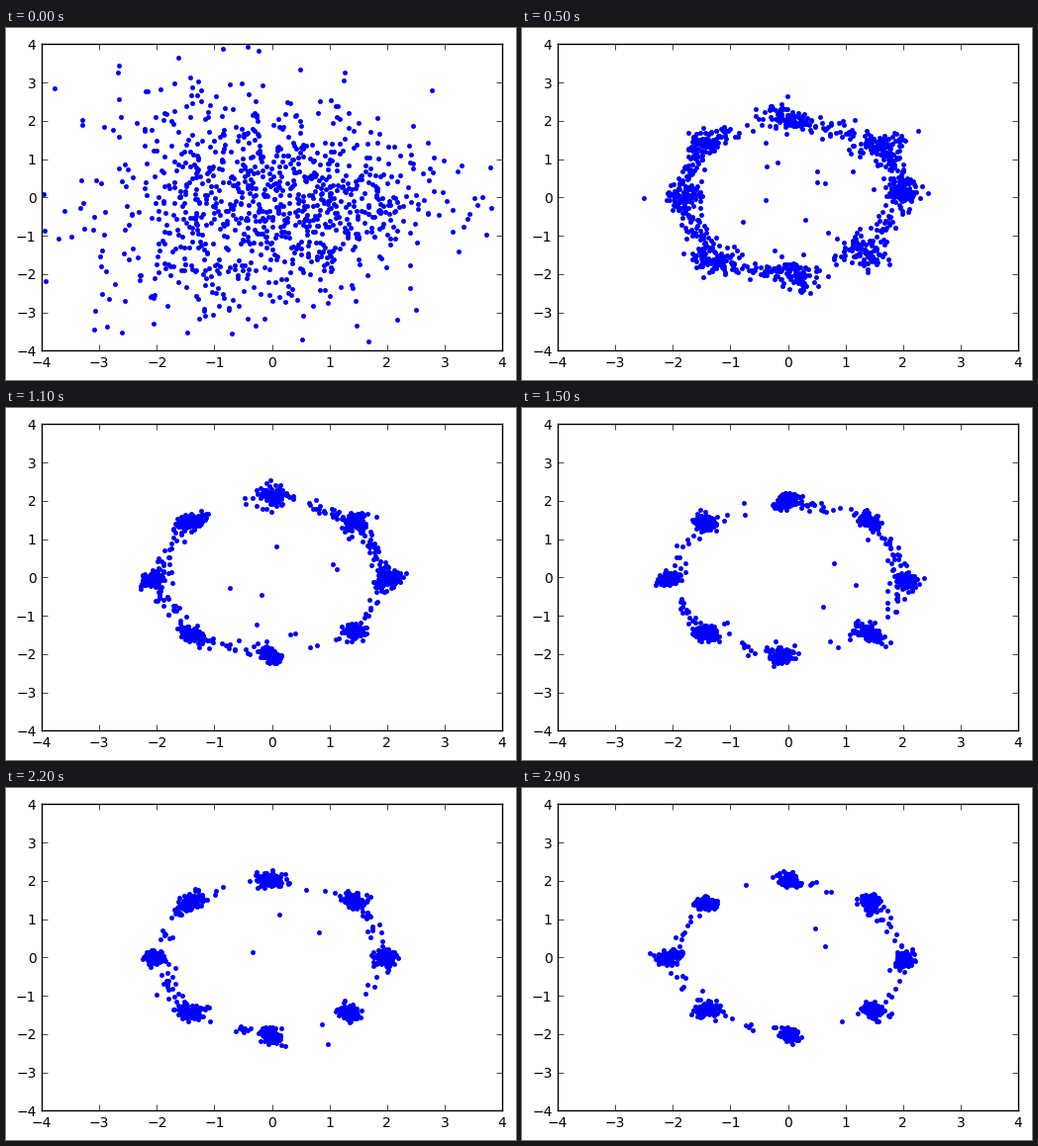
A matplotlib script that plays this animation: 515 by 356 pixels, repeating every 3 s.

```python
import numpy as np
import matplotlib.pyplot as plt
from matplotlib.animation import FuncAnimation

WIDTH, HEIGHT, DPI = 515, 356, 100
FRAMES, INTERVAL = 30, 100
POINTS, MODES, RADIUS = 1000, 8, 2.03

plt.rcParams.update({
    "font.family": "DejaVu Sans",
    "font.size": 10,
    "axes.linewidth": 1.0,
    "axes.axisbelow": False,
    "xtick.major.size": 4, "ytick.major.size": 4,
    "xtick.major.width": 0.5, "ytick.major.width": 0.5,
    "xtick.major.pad": 4, "ytick.major.pad": 4,
    "xtick.direction": "in", "ytick.direction": "in",
    "xtick.top": True, "ytick.right": True,
})


def polar(radius, angle):
    return np.column_stack([radius * np.cos(angle), radius * np.sin(angle)])


def fade(i, start, end, pace):
    """Ease exponentially from start towards end."""
    return end + (start - end) * np.exp(-i / pace)


def cloud(rng):
    """Untrained samples: a funnel, tall on the left and flat on the right."""
    x = rng.normal(-0.05, 1.45, POINTS)
    y = rng.normal(-0.05, 1, POINTS) * np.clip(1.4 - 0.18 * x, 0.6, 1.8)
    return np.column_stack([x, y])


def bridge(rng, a, b, count, noise):
    """Samples caught between two modes, on a slightly bulging line."""
    t = rng.uniform(0.08, 0.92, (count, 1))
    path = (a * (1 - t) + b * t) * (1 + 0.1 * t * (1 - t))
    return path + rng.normal(0, noise, path.shape)


def blob(rng, center, count, spread):
    """Samples settled around one mode, stretched and slanted a little."""
    offset = rng.normal(0, spread, (count, 2)) * rng.uniform(0.8, 1.2, 2)
    offset[:, 1] += rng.uniform(-0.5, 0.5) * offset[:, 0]
    return center + offset


def ring(rng, i):
    spread = fade(i, 0.58, 0.098, 3)
    angles = np.arange(MODES) * 2 * np.pi / MODES
    modes = polar(RADIUS, angles)
    modes += rng.normal(0, fade(i, 0.3, 0.04, 3), modes.shape)

    # Bridges are fullest at the upper right and lower left.
    fullness = 1 + 0.75 * np.cos(2 * angles)
    counts = rng.poisson(fade(i, 82, 7, 7) * fullness)
    strays = int(fade(i, 44, 4, 7))
    parts = [polar(rng.uniform(0.3, 2.5, strays),
                   rng.uniform(0, 2 * np.pi, strays))]

    settled = (POINTS - strays - counts.sum()) // MODES
    for a, b, count in zip(modes, np.roll(modes, -1, axis=0), counts):
        parts.append(bridge(rng, a, b, count, 0.03 + 0.45 * spread))
        parts.append(blob(rng, a, settled, spread))
    return rng.permutation(np.concatenate(parts))


def samples(i):
    rng = np.random.default_rng(100 + i)
    target = ring(rng, i)
    untrained = 0.45 ** i
    return untrained * cloud(rng)[:len(target)] + (1 - untrained) * target


fig = plt.figure(figsize=(WIDTH / DPI, HEIGHT / DPI), dpi=DPI, facecolor="white")
ax = fig.add_axes([36 / WIDTH, 29.65 / HEIGHT, 465 / WIDTH, 310 / HEIGHT])
ax.set(xlim=(-4, 4), ylim=(-4, 4), xticks=range(-4, 5), yticks=range(-4, 5))
dots, = ax.plot([], [], ".", color="#0000ff", markersize=6, markeredgewidth=0.5)


def draw(i):
    dots.set_data(*samples(i).T)
    return dots,


anim = FuncAnimation(fig, draw, frames=FRAMES, interval=INTERVAL, repeat=True,
                     repeat_delay=0)
plt.show()
```
